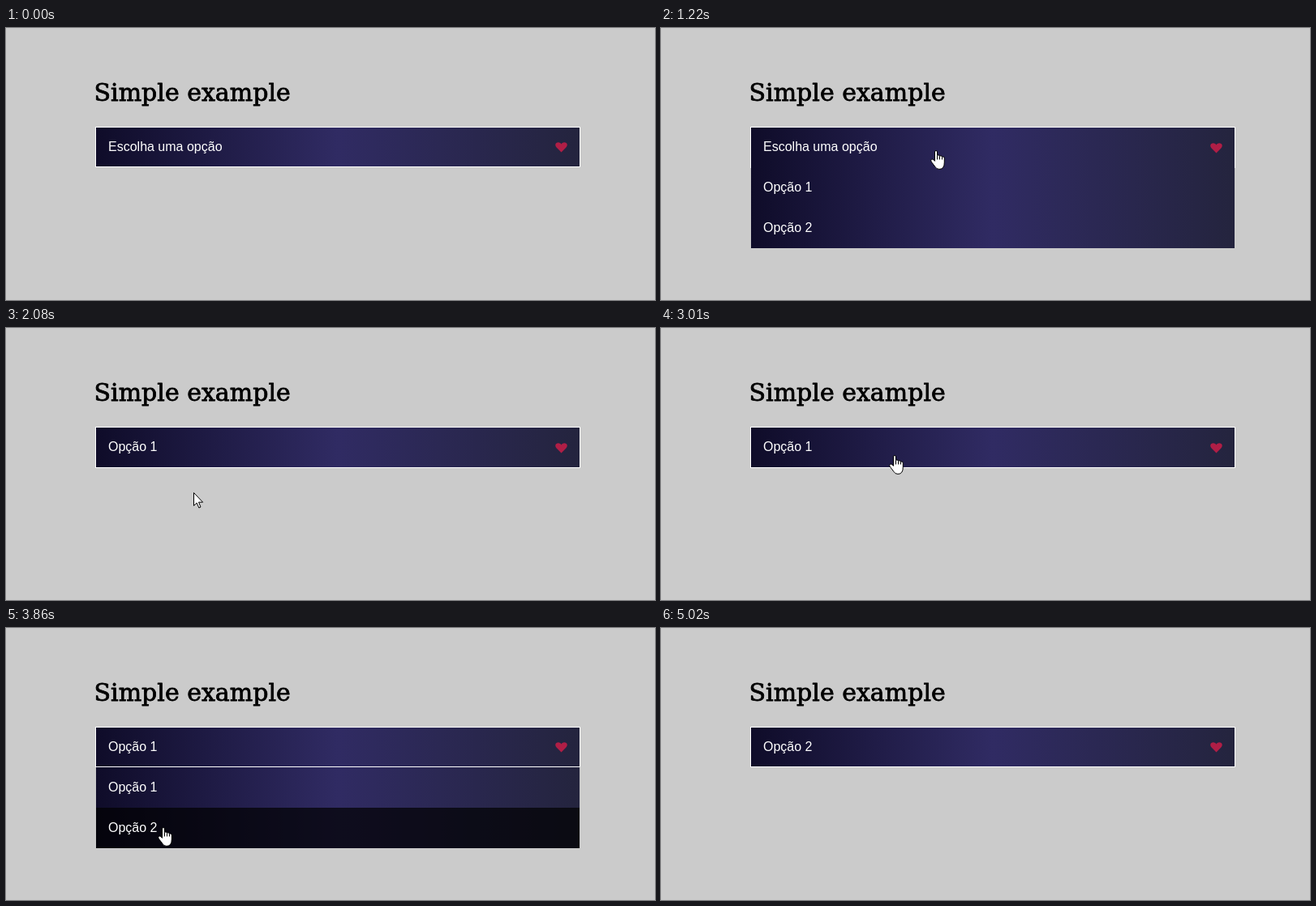
Recreate the animation shown at these times as an HTML page with a canvas. Size 800 px wide and 336 px high, loop 5720 ms.

```html
<!DOCTYPE html>
<html lang="pt">
<head>
<meta charset="utf-8">
<title>Simple example</title>
<style>
  html, body { margin: 0; width: 100%; height: 100%; overflow: hidden; background: #cbcbcb; }
  canvas { display: block; width: 800px; height: 336px; }
</style>
</head>
<body>
<canvas id="stage" width="800" height="336"></canvas>
<script>
const ctx = document.getElementById('stage').getContext('2d');
const LOOP = 5720;
const ROW = { x: 111, w: 596, h: 50 };

const arrow = new Path2D('M.5 .5V16.5L4.2 13.1L6.8 19.1L9 18.1L6.5 12.2H11.6Z');
const hand = new Path2D('M5.5 2Q5.5 .5 7 .5T8.5 2V6.6Q9 5.9 10 5.9Q11.3 5.9 11.5 7.4Q12 6.8 13 6.8' +
  'Q14.3 6.8 14.5 8.4Q15 8 15.8 8Q17.3 8 17.3 10V15Q17.3 23.4 11 23.4Q7.5 23.4 6 20.5L1.2 14.2' +
  'Q.2 12.4 1.4 11.4Q2.8 10.5 4.2 12L5.5 13.4ZM8.5 6.6V11.5M11.5 7.4V11.5M14.5 8.4V11.5');
const heart = new Path2D('M684.5 153.4L678.6 147.4C675.7 144 678 141.2 680.7 141.2' +
  'C682.6 141.2 683.8 142.2 684.5 143.4C685.2 142.2 686.4 141.2 688.3 141.2C691 141.2 693.3 144 690.4 147.4Z');

const shade = ctx.createLinearGradient(ROW.x, 0, ROW.x + ROW.w, 0);
shade.addColorStop(0, '#0f0c29');
shade.addColorStop(0.5, '#302b63');
shade.addColorStop(1, '#24243e');

// Pointer moves in discrete steps along quadratic curves.
const moves = [
  { start: 300, end: 840, steps: 8, from: [654, 312], via: [440, 215], to: [338, 152], enters: true },
  { start: 1470, end: 1850, steps: 6, from: [338, 152], via: [275, 182], to: [231, 203] },
  { start: 2320, end: 2860, steps: 8, from: [231, 203], via: [255, 297], to: [286, 182] },
  { start: 2940, end: 3010, steps: 2, from: [286, 182], via: [287, 170], to: [287, 158] },
  { start: 3640, end: 3860, steps: 4, from: [287, 158], via: [235, 210], to: [193, 247] },
  { start: 4790, end: 5020, steps: 4, from: [193, 247], via: [460, 305], to: [741, 346] }
];

function pointerAt(t) {
  const m = moves.filter(move => t >= move.start).pop();
  if (!m || t >= 5020) return null;
  const k = Math.min(m.steps - 1, Math.floor((t - m.start) / (m.end - m.start) * (m.steps - 1) + 1e-6));
  const u = m.enters ? k / (m.steps - 1) : (k + 1) / m.steps;
  const v = 1 - u;
  const [x, y] = [0, 1].map(i => Math.round(v * v * m.from[i] + 2 * u * v * m.via[i] + u * u * m.to[i]));
  return { x, y };
}

function label(text, y) {
  ctx.font = '16px "Liberation Sans", Arial, sans-serif';
  ctx.fillStyle = '#fff';
  ctx.fillText(text, 126, y);
}

function drawTitle() {
  ctx.font = '30px "Roboto Slab", "DejaVu Serif", serif';
  ctx.fillStyle = ctx.strokeStyle = '#000';
  ctx.lineWidth = 0.8;
  ctx.lineJoin = 'round';
  ctx.fillText('Simple example', 108.5, 90);
  ctx.strokeText('Simple example', 108.5, 90);
}

// The field is one pixel taller during the first selection.
function drawField(text, extra) {
  ctx.fillStyle = '#fff';
  ctx.fillRect(110, 122, 598, 50 + extra);
  ctx.fillStyle = shade;
  ctx.fillRect(ROW.x, 123, ROW.w, 48 + extra);
  label(text, 152);
  ctx.save();
  ctx.translate(0, extra);
  ctx.fillStyle = '#b01e46';
  ctx.fill(heart);
  ctx.restore();
}

function drawList(pointer) {
  ['Opção 1', 'Opção 2'].forEach((text, i) => {
    const y = 172 + i * ROW.h;
    ctx.fillStyle = shade;
    ctx.fillRect(ROW.x, y, ROW.w, ROW.h);
    if (pointer.y >= y && pointer.y < y + ROW.h) {
      ctx.fillStyle = 'rgba(0,0,0,.7)';
      ctx.fillRect(ROW.x, y, ROW.w, ROW.h);
    }
    label(text, y + 30);
  });
}

function drawPointer({ x, y }, open) {
  const over = x >= 110 && x < 708 && y >= 122 && y < (open ? 272 : 172);
  const shape = over ? hand : arrow;
  ctx.save();
  ctx.translate(over ? x - 6 : x, over ? y - 1 : y);
  ctx.lineWidth = 1;
  ctx.lineJoin = 'round';
  ctx.strokeStyle = '#000';
  ctx.fillStyle = '#fff';
  ctx.fill(shape);
  ctx.stroke(shape);
  ctx.restore();
}

function draw(t) {
  const open = (t >= 1220 && t < 2080) || (t >= 3330 && t < 4240);
  const extra = t >= 1220 && t < 3330 ? 1 : 0;
  const choice = t < 2080 ? 'Escolha uma opção' : t < 4240 ? 'Opção 1' : 'Opção 2';
  const pointer = pointerAt(t);
  ctx.fillStyle = '#cbcbcb';
  ctx.fillRect(0, 0, 800, 336);
  drawTitle();
  drawField(choice, extra);
  if (open) drawList(pointer);
  if (pointer) drawPointer(pointer, open);
}

const begin = performance.now();
function tick() {
  draw((performance.now() - begin) % LOOP);
  requestAnimationFrame(tick);
}
tick();
</script>
</body>
</html>
```
